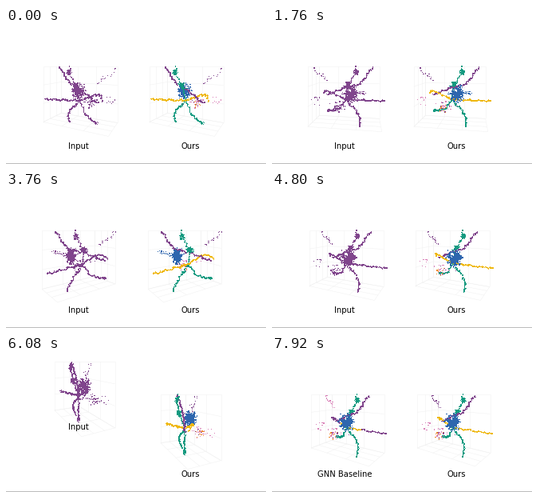
A matplotlib script that plays this animation: 326x170 px, repeating every 8 s.

```python
import numpy as np
import matplotlib.pyplot as plt
from matplotlib.animation import FuncAnimation
from matplotlib.collections import LineCollection
from matplotlib.colors import to_rgba

W, H, FRAMES, STEP = 326, 170, 100, 80
PX = 0.72  # points per pixel at 100 dpi
TURN = np.radians(9)
HORIZON, CAMERA = 48, 185
LEFT_X, RIGHT_X, BASELINE = 93, 226, 151
PURPLE, GREEN, YELLOW = "#80458c", "#159a80", "#efb810"
BLUE, PINK, ORANGE = "#2e66ae", "#d981b8", "#ee8a2c"

rng = np.random.default_rng(7)
points, ours_colors, gnn_colors = [], [], []


def add(pos, color, gnn=None):
    points.append(pos)
    ours_colors.extend([to_rgba(color)] * len(pos))
    gnn_colors.extend([to_rgba(gnn or color)] * len(pos))


def branch(*keys, density=2.6, spread=0.4):
    """Dots along a rounded, slightly crooked path through the key points."""
    keys = np.array(keys, float)
    dist = np.r_[0, np.cumsum(np.linalg.norm(np.diff(keys, axis=0), axis=1))]
    n = int(dist[-1] * density)
    at = np.linspace(0, dist[-1], n)
    pad = n // 14
    window = np.ones(2 * pad + 1) / (2 * pad + 1)
    path = np.column_stack([
        np.convolve(np.pad(np.interp(at, dist, k), pad, mode="reflect", reflect_type="odd"),
                    window, "valid") for k in keys.T])
    phase = rng.uniform(0, 2 * np.pi, 3)
    crook = 0.5 * np.sin(at[:, None] * 0.45 + phase) + 0.4 * np.sin(at[:, None] * 1.1 - phase)
    return path + crook + rng.normal(0, spread, (n, 3))


def puff(center, size, n):
    return np.array(center) + rng.normal(0, 1, (n, 3)) * size


def bush(center, size, strands, steps=9):
    way = rng.normal(0, 1, (strands, 1, 3))
    way /= np.linalg.norm(way, axis=2, keepdims=True)
    reach = rng.uniform(0.4, 1.1, (strands, 1, 1)) * np.linspace(0, 1, steps)[:, None]
    jitter = np.cumsum(rng.normal(0, 0.3, (strands, steps, 3)), axis=1)
    return (np.array(center) + way * reach * size + jitter).reshape(-1, 3)


# Coordinates: two horizontal axes, then the height in screen pixels.
soma, crown, tuft, hub = (-12, 3, 80), (8, 5, 72), (1, 14, 55), (3, 0, 90)
west, arch, east = (-13, 47, 92), (16, -22, 79), (28, -24, 84)

yellow = branch(west, hub, arch, east)
third = len(yellow) // 3
add(yellow[:third], YELLOW, PURPLE)
add(yellow[third:-third], YELLOW)
add(yellow[-third:], YELLOW, PURPLE)

add(branch((-17, 28, 49), (-11, 15, 69), (8, -2, 77), (27, -18, 87)), PURPLE)
add(branch(hub, (-3, 15, 106), (-11, 15, 121), density=2), GREEN)
add(branch(hub, (12, -6, 105), (26, -17, 109), density=2), GREEN)
add(puff((26, -17, 109), 1, 18), GREEN)
add(branch(tuft, crown, hub, density=1.3), GREEN)
for center, size, count in ((tuft, (3, 3, 6), 10), (crown, (4, 4, 5), 18)):
    add(bush(center, size, count), GREEN)
    add(puff(center, np.array(size) / 3, 25), GREEN)

add(bush(soma, (6, 12, 11), 36), BLUE)
add(puff(soma, (2.5, 4, 4.5), 120), BLUE)
add(branch(soma, (-35, 9, 76), density=1, spread=1), BLUE)
for color, count in ((PINK, 18), (ORANGE, 9), (PURPLE, 7)):
    add(puff((-9, -12, 95), (4, 4, 3), count), color)
add(branch((20, -20, 66), (36, -37, 51), density=0.6, spread=1.4), PURPLE, PINK)
add(puff((12, -36, 92), (6, 4, 3), 8), PINK)

points = np.vstack(points)
ours_colors, gnn_colors = np.array(ours_colors), np.array(gnn_colors)
input_colors = np.tile(to_rgba(PURPLE), (len(points), 1))


def project(pos, angle):
    """Return screen positions around x = 0 and the depth towards the viewer."""
    c, s = np.cos(angle), np.sin(angle)
    u, w, y = np.moveaxis(pos, -1, 0)
    depth = u * c + w * s
    scale = 1 / (1 - depth / CAMERA)
    return np.stack([(u * s - w * c) * scale, HORIZON + (y - HORIZON) * scale], axis=-1), depth


BOX_ANGLE, LENGTH, WIDTH, TOP, FLOOR = np.radians(297), 42, 20, 48, 118


def grid_lines(angle):
    """Floor and the two walls facing away from the viewer."""
    angle = angle - BOX_ANGLE
    end = -LENGTH if np.cos(angle) > 0 else LENGTH
    side = -WIDTH if np.sin(angle) > 0 else WIDTH
    lines = []
    for f in np.linspace(-1, 1, 4):
        u, w, y = f * LENGTH, f * WIDTH, TOP + (f + 1) / 2 * (FLOOR - TOP)
        lines += [[(u, -WIDTH, FLOOR), (u, WIDTH, FLOOR)],
                  [(-LENGTH, w, FLOOR), (LENGTH, w, FLOOR)],
                  [(u, side, TOP), (u, side, FLOOR)],
                  [(end, w, TOP), (end, w, FLOOR)],
                  [(-LENGTH, side, y), (LENGTH, side, y)],
                  [(end, -WIDTH, y), (end, WIDTH, y)]]
    return project(np.array(lines, float), angle)[0]


fig = plt.figure(figsize=(W / 100, H / 100), dpi=100, facecolor="white")
ax = fig.add_axes([0, 0, 1, 1])
ax.set(xlim=(0, W), ylim=(H, 0))
ax.axis("off")
ax.axhspan(H - 1, H, color="#bcbcbc", lw=0)


class Panel:
    def __init__(self, label, x, label_x, colors):
        self.x, self.colors = x, colors
        self.grid = LineCollection([], colors="#f1f1f1", linewidths=0.5 * PX, zorder=1)
        ax.add_collection(self.grid)
        self.dots = ax.scatter(*points[:, :2].T, s=(1.25 * PX) ** 2, c=colors,
                               marker="s", linewidths=0, zorder=2)
        self.label = ax.text(label_x, BASELINE, label, ha="center", va="baseline",
                             fontsize=7.2, family="DejaVu Sans", color="black", zorder=3)

    def draw(self, xy, order, lines, shift=0, label_shift=0):
        offset = np.array([self.x, shift])
        self.dots.set_offsets(xy[order] + offset)
        self.dots.set_facecolors(self.colors[order])
        self.grid.set_segments(lines + offset)
        self.label.set_y(BASELINE + label_shift)


source = Panel("Input", LEFT_X, 90.5, input_colors)
baseline = Panel("GNN Baseline", LEFT_X, 91.5, gnn_colors)
ours = Panel("Ours", RIGHT_X, 231.5, ours_colors)


def update(frame):
    angle = frame * TURN
    xy, depth = project(points, angle)
    view = xy, np.argsort(depth), grid_lines(angle)
    t = np.clip((frame - 70) / 17, 0, 1)
    slide = (1 - np.cos(np.pi * t)) / 2
    source.draw(*view, -147 * slide, -214 * slide)
    rise = 200 * (1 - slide)
    baseline.draw(*view, rise, rise)
    ours.draw(*view)
    return []


anim = FuncAnimation(fig, update, frames=FRAMES, interval=STEP, repeat=True, repeat_delay=0)
plt.show()
```
